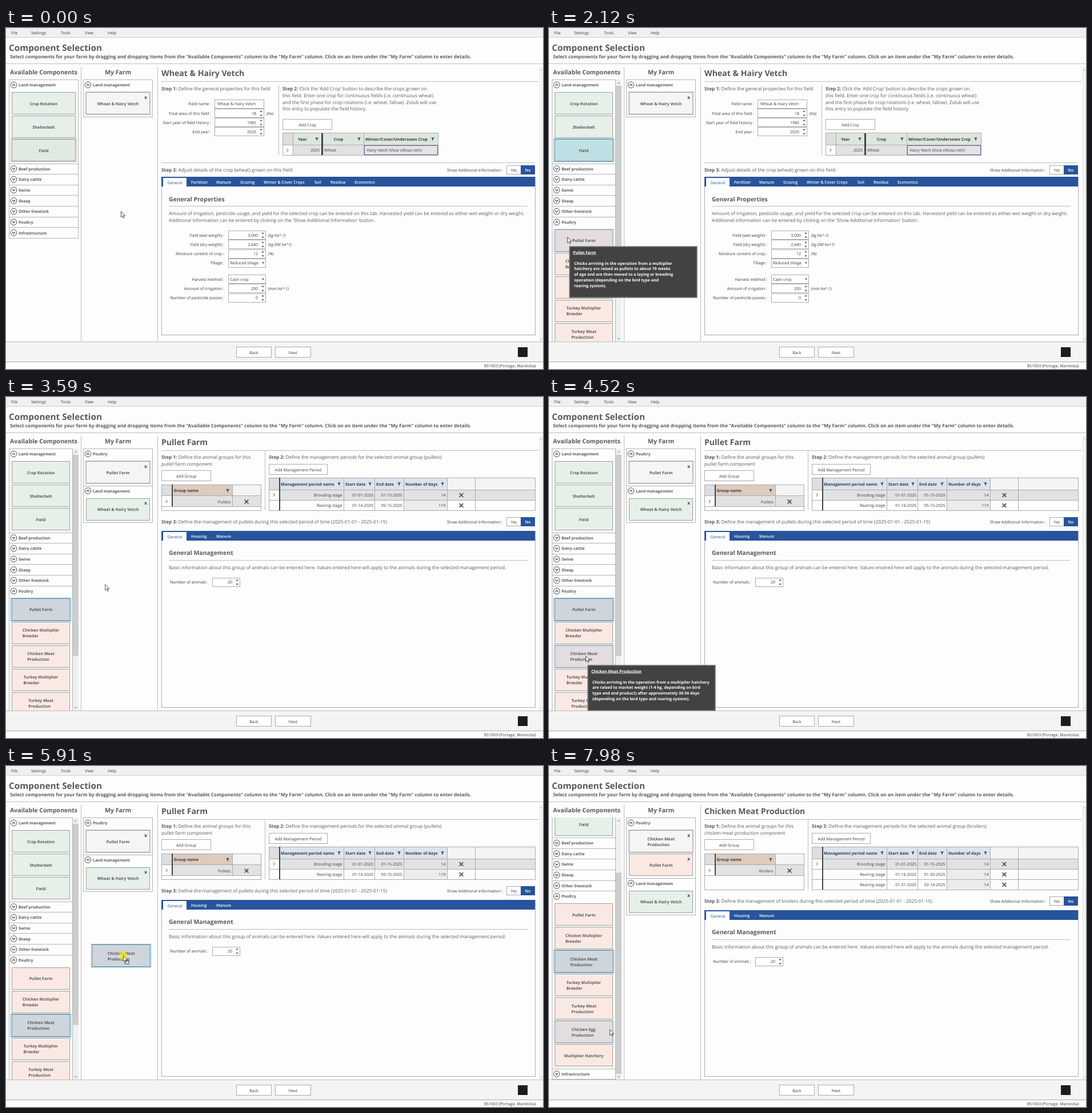
Animation, 940 px wide and 596 px high, one loop 8 s. Source, as an HTML page:

```html
<!DOCTYPE html>
<html lang="en">
<head>
<meta charset="utf-8">
<title>Component selection</title>
<style>
html, body { margin: 0; width: 100%; height: 100%; overflow: hidden; background: #fdfdfd; }
svg { display: block; width: 100%; height: 100%; }
text { font-family: "Open Sans", "Noto Sans", sans-serif; fill: #3c3c3c; text-rendering: geometricPrecision; }
.b { font-weight: 700; }
.s { font-weight: 600; }
.i { font-style: italic; }
.m { text-anchor: middle; }
.e { text-anchor: end; }
.g { fill: #5a5a5a; }
.w { fill: #fff; }
.n { fill: #27549b; }
.u { text-decoration: underline; }
</style>
</head>
<body>
<svg id="stage" viewBox="0 0 940 596" xmlns="http://www.w3.org/2000/svg"></svg>
<script>
const LOOP = 8000, STEP = 66.5;
const SMALL = 7.05, BODY = 8.26;
const BLUE = '#27549b', GRAY = '#ababab', SHADE = '#e2e2e2';

// cursor: time, x, y
const MOVES = [
  [140, 201, 320], [860, 22, 337], [1530, 22, 337], [1850, 32, 365],
  [2320, 32, 365], [2400, 106, 363], [2660, 176, 324], [3530, 176, 324],
  [4320, 64, 452], [4720, 64, 452], [4800, 78, 448], [5580, 199, 341],
  [5910, 205, 331], [6190, 205, 331], [6840, 124, 365], [6850, 124, 365],
  [7250, 125, 416], [7640, 125, 450], [7790, 125, 450], [7980, 106, 460]
];
const THUMB = [[6850, 0], [7250, 51.5], [7640, 85.5]];
const PRESSES = [[1200, 1330], [2250, 2920], [4580, 6050], [6910, 7710]];

const LAND = ['Crop Rotation', 'Shelterbelt', 'Field'];
const BIRDS = ['Pullet Farm', 'Chicken Multiplier|Breeder', 'Chicken Meat|Production', 'Turkey Multiplier|Breeder',
  'Turkey Meat|Production', 'Chicken Egg|Production', 'Multiplier Hatchery'];
const WHEAT = 'Wheat & Hairy Vetch', PULLET = BIRDS[0], BROILER = BIRDS[2];
const INDENT = { 'Chicken Multiplier': 32.2, 'Turkey Multiplier': 30.4, 'Chicken Meat': 23.8, 'Turkey Meat': 21.7, 'Chicken Egg': 21.5 };

const within = (t, [a, b]) => t >= a && t < b;

function track(keys, t) {
  if (t <= keys[0][0]) return keys[0].slice(1);
  for (let k = 1; k < keys.length; k++) {
    const [t0, ...a] = keys[k - 1], [t1, ...b] = keys[k];
    if (t < t1) {
      const p = (t - t0) / (t1 - t0), s = p * p * (3 - 2 * p);
      return a.map((v, j) => v + (b[j] - v) * s);
    }
  }
  return keys[keys.length - 1].slice(1);
}

// y is the middle of the capitals
const txt = (x, y, s, cls = '', size = SMALL) =>
  `<text x="${x}" y="${(y + size * 0.357).toFixed(2)}" font-size="${size}" class="${cls}">${s}</text>`;
const fill = (x, y, r, b, color) => `<rect x="${x}" y="${y}" width="${r - x}" height="${b - y}" fill="${color}"/>`;
const box = (x, y, r, b, color = 'none', stroke = GRAY) => {
  const top = Math.round(y), low = Math.round(b);
  return `<rect x="${x + 0.5}" y="${top + 0.5}" width="${r - x - 1}" height="${low - top - 1}" fill="${color}" stroke="${stroke}"/>`;
};
const hline = (x, r, y, color = '#bdbdbd') => fill(x, y, r, y + 1, color);
const vline = (x, y, b, color = '#bdbdbd') => fill(x, y, x + 1, b, color);
const path = (x, y, d, attrs) => `<path transform="translate(${x} ${y})" d="${d}" ${attrs}/>`;
const chevron = (x, y, up, size, color, w = 1) =>
  path(x, y, up ? `M${-size} ${size / 2}L0 ${-size / 2}L${size} ${size / 2}` : `M${-size} ${-size / 2}L0 ${size / 2}L${size} ${-size / 2}`,
    `fill="none" stroke="${color}" stroke-width="${w}"`);
const triangle = (x, y, up) => path(x, y, up ? 'M-2 1.3H2L0-1.5Z' : 'M-2-1.3H2L0 1.5Z', 'fill="#444"');
const funnel = (x, y) => path(x, y, 'M-2.8-2.6H2.8L.8 .2V3L-.8 2V.2Z', 'fill="#444"');
const cross = (x, y) => path(x, y, 'M-3.4-3.4L3.4 3.4M3.4-3.4L-3.4 3.4', 'stroke="#4a4a4a" stroke-width="1.5"');
const pointer = (x, y) => path(x, y, 'M1.5-2.6L4 0L1.5 2.6', 'fill="none" stroke="#444"');
const button = (x, y, r, b, s) => box(x, y, r, b, '#fff') + txt((x + r) / 2, (y + b) / 2 + 0.5, s, 'm');
const step = (x, y, n, s) => txt(x, y, `<tspan class="b">Step ${n}:</tspan> ${s}`, 'g', BODY);

function label(cx, cy, name) {
  const [first, second] = name.split('|');
  if (!second) return txt(cx, cy + 0.5, first, 'b g m');
  const x = cx - INDENT[first];
  return txt(x, cy - 4.5, first, 'b g') + txt(x, cy + 5.5, second, 'b g');
}

function tile(x, y, r, name, state) {
  const land = LAND.includes(name) || name === WHEAT;
  const look = {
    sel: ['#e0f0f9', '#4fa9d8', land ? '#bfe0e3' : '#cfd5dc'],
    hover: ['#f4f9fc', '#b3d6e9', land ? '#dbe8e6' : '#e3dde0'],
    idle: ['#f6f6f6', '#c6c6c6', '#e0eae2'],
    own: ['#fdfdfd', '#d2d2d2', '#f5f5f5']
  }[state];
  const color = look ? look[2] : land ? '#e6f0e8' : '#fae9e3';
  return (look ? box(x - 2, y - 1, r + 2, y + 40, look[0], look[1]) : '') +
    box(x, y, r, y + 39, color, '#9a9d9b') + label((x + r) / 2, y + 19.5, name);
}

function groups(x, y, r, list, stateOf, extra) {
  let out = '';
  for (const [title, tiles = []] of list) {
    const n = tiles.length, h = n ? 23.5 + 41 * n : 18.65;
    const hot = stateOf(title, x, y, r, y + 18) === 'hover';
    out += box(x, y, r, y + h + 1, '#fdfdfd', '#b4b4b4') +
      `<circle cx="${x + 8.5}" cy="${y + 9.5}" r="5.3" fill="${hot ? '#d8eefa' : '#fff'}" stroke="${hot ? '#3f9fd6' : '#444'}"/>` +
      chevron(x + 8.5, y + 9.5, n > 0, 2.4, '#333', 1.2) + txt(x + 17, y + 9.7, title, 'b g', 6.95);
    tiles.forEach((name, k) => {
      const top = y + 22 + 41 * k;
      out += tile(x + 5, top, r - 5, name, stateOf(name, x + 3, top - 1, r - 3, top + 40));
      if (extra) out += txt(r - 12.5, top + 9, 'x', 'b m', 8);
    });
    y += h;
  }
  return out;
}

function input(x, r, y, value, kind = 'num') {
  let out = box(x, y - 8, r, y + 8, '#fff');
  if (kind === 'num') out += txt(r - 14, y, value, 'e') + triangle(r - 5.5, y - 3.6, true) + triangle(r - 5.5, y + 4, false);
  else out += txt(x + (kind === 'combo' ? 3 : 5), y, value) + (kind === 'combo' ? triangle(r - 5, y, false) : '');
  return out;
}
const row = (lx, x, r, y, name, value, unit = '', kind) =>
  txt(lx, y, name + ' :', 'e') + input(x, r, y, value, kind) + txt(r + 4, y, unit, 'i');

const toggle = y => txt(772, y, 'Show Additional Information :') + box(876, y - 8, 902, y + 8, '#fff') +
  txt(889, y, 'Yes', 'm') + fill(901, y - 8, 926, y + 8, BLUE) + txt(913.5, y, 'No', 'm w s');

function tabs(y, bottom, list) {
  return box(272, y, 927, bottom, '#fdfdfd', '#a3abb8') + fill(272, y, 926, y + 17, BLUE) +
    fill(275, y + 2, 316, y + 17, '#fdfdfd') + txt(295.5, y + 10, 'General', 'm n') +
    list.map(([x, s]) => txt(x, y + 10, s, 'w s', 6.95)).join('');
}

function frame() {
  const menu = [[9, 'File'], [44, 'Settings'], [96, 'Tools'], [138, 'View'], [178, 'Help']];
  return fill(0, 0, 940, 596, '#fdfdfd') + fill(0, 0, 940, 17, '#f0f0f0') + hline(0, 940, 16, '#cfcfcf') +
    menu.map(([x, s]) => txt(x, 8.5, s)).join('') +
    txt(5, 34.5, 'Component Selection', 'b g', 15.3) +
    txt(7, 50.5, 'Select components for your farm by dragging and dropping items from the "Available Components" column to the "My Farm" column. Click on an item under the "My Farm" column to enter details.', 'b g', 8.27) +
    hline(0, 940, 62) + vline(131, 68, 548) + vline(265, 68, 548) +
    txt(7, 77, 'Available Components', 'b g', 10.55) + txt(196, 77, 'My Farm', 'b g m', 10.55) +
    fill(933, 68, 940, 548, '#f2f2f2') + chevron(937, 73, true, 2, '#bbb') + chevron(937, 544, false, 2, '#bbb') +
    fill(0, 549, 940, 583, '#f4f4f4') + hline(0, 940, 548) + hline(0, 940, 583, '#a8a8a8') +
    button(403, 557, 465, 576, 'Back') + button(471, 557, 534, 576, 'Next') +
    fill(896, 558, 913, 575, '#1c1c1c') + txt(837, 590.5, '851003 (Portage, Manitoba)');
}

function fieldPanel() {
  const intro = ["Click the 'Add Crop' button to describe the crops grown on", 'this field. Enter one crop for continuous fields (i.e. continuous wheat)',
    'and the first phase for crop rotations (i.e. wheat, fallow). Zolub will use', 'this entry to populate the field history.'];
  return txt(272, 79, WHEAT, 'b g', 14.1) + hline(272, 932, 93) + vline(477, 100, 222) +
    step(272, 106, 1, 'Define the general properties for this field') +
    row(359, 365, 452, 132.5, 'Field name', WHEAT, '', 'text') +
    row(359, 365, 452, 149, 'Total area of this field', '18', '(ha)') +
    row(359, 365, 452, 165, 'Start year of field history', '1985') +
    row(359, 365, 452, 181, 'End year', '2025') +
    step(484, 106, 2, intro[0]) + intro.slice(1).map((s, k) => txt(484, 118 + 11.7 * k, s, 'g', BODY)).join('') +
    button(484, 159, 571, 178, 'Add Crop') +
    fill(484, 183, 756, 204, '#dde6de') + fill(484, 183, 502, 204, '#dedede') + fill(502, 204, 756, 222, SHADE) +
    box(484, 183, 757, 223) + hline(484, 756, 204, GRAY) + vline(502, 183, 222, GRAY) + vline(626, 183, 222, GRAY) +
    fill(552, 184, 555, 222, '#444') + pointer(490, 213.5) +
    txt(519, 194.5, 'Year', 'b m') + txt(582, 194.5, 'Crop', 'b m') + txt(629, 194.5, 'Winter/Cover/Undersown Crop', 'b', 7.1) +
    funnel(544, 194) + funnel(618, 194) + funnel(747, 194) +
    txt(549, 213.5, '2025', 'e') + txt(557, 213.5, 'Wheat') +
    box(627, 205, 756, 222, '#e4e4e7', '#5c6c92') + txt(631.5, 213.5, 'Hairy Vetch (Vicia villosa roth)') +
    hline(272, 926, 235) + step(272, 248.5, 3, 'Adjust details of the crop (wheat) grown on this field') + toggle(248) +
    tabs(260, 537, [[324, 'Fertilizer'], [368, 'Manure'], [410, 'Grazing'], [451, 'Winter & Cover Crops'], [540, 'Soil'], [568, 'Residue'], [610, 'Economics']]) +
    txt(285, 299, 'General Properties', 'b g', 10.45) + hline(285, 913, 311) +
    txt(285, 324.5, 'Amount of irrigation, pesticide usage, and yield for the selected crop can be entered on this tab. Harvested yield can be entered as either wet weight or dry weight.', 'g', BODY) +
    txt(285, 336.5, "Additional information can be entered by clicking on the 'Show Additional Information' button.", 'g', BODY) +
    row(382, 389, 455, 362, 'Yield (wet weight)', '3,000', '(kg ha^-1)') +
    row(382, 389, 455, 378, 'Yield (dry weight)', '2,640', '(kg DM ha^1)') +
    row(382, 389, 455, 394.5, 'Moisture content of crop', '12', '(%)') +
    row(382, 389, 455, 410.5, 'Tillage', 'Reduced tillage', '', 'combo') +
    row(382, 389, 455, 439, 'Harvest method', 'Cash crop', '', 'combo') +
    row(382, 389, 455, 455, 'Amount of irrigation', '200', '(mm ha^-1)') +
    row(382, 389, 455, 471.5, 'Number of pesticide passes', '0');
}

function birdPanel(title, part, group, periods) {
  const low = 162 + 18 * periods.length, d = low - 198;
  const heads = [[481, 583, 'Management period name'], [594, 637, 'Start date'], [648, 688, 'End date'], [699, 764, 'Number of days']];
  const cells = periods.map(([name, from, to, days], k) => {
    const y = 171.5 + 18 * k;
    return txt(588.5, y, name, 'e') + txt(643, y, from, 'e') + txt(693.5, y, to, 'e') + txt(769.5, y, days, 'e') +
      cross(797, y) + hline(460, 926, 162 + 18 * k, GRAY);
  }).join('');
  return txt(272, 79, title, 'b g', 14.06) + hline(272, 932, 93) + vline(453, 94, low) +
    step(272, 105, 1, 'Define the animal groups for this') + txt(272, 117, part + ' component', 'g', BODY) +
    button(272, 128, 359, 147, 'Add Group') +
    fill(272, 153, 446, 173, '#f4f4f4') + fill(272, 153, 290, 173, '#dedede') + fill(292, 153, 396, 173, '#dccbbf') +
    fill(292, 173, 446, 191, SHADE) + box(272, 153, 447, low + 1) + hline(272, 446, 172, GRAY) + hline(272, 446, 191, GRAY) +
    vline(396, 153, 191, GRAY) + fill(290, 153, 292, 191, '#444') + pointer(278.5, 182.5) +
    txt(293.5, 163.5, 'Group name', 'b') + funnel(388, 163.5) + txt(393, 183, group, 'e') + cross(421, 183) +
    step(460, 105, 2, `Define the management periods for the selected animal group (${group.toLowerCase()})`) +
    button(460, 117, 563, 136, 'Add Management Period') +
    fill(460, 141, 926, 162, '#f4f4f4') + fill(460, 141, 478, 162, '#dedede') + fill(480, 141, 772, 162, '#dbe3f0') +
    fill(696, 162, 772, low, '#ececec') + fill(480, 162, 926, 180, SHADE) +
    box(460, 141, 927, low + 1) + [591, 645, 696, 772, 821].map(x => vline(x, 141, low, GRAY)).join('') +
    cells + fill(478, 141, 480, low, '#444') + pointer(466.5, 171) +
    heads.map(([x, f, s]) => txt(x, 152.5, s, 'b', 7.1) + funnel(f, 152)).join('') +
    step(272, 218.5 + d, 3, `Define the management of ${group.toLowerCase()} during this selected period of time (2025-01-01 - 2025-01-15)`) +
    toggle(218 + d) + tabs(234 + d, 543, [[324, 'Housing'], [368, 'Manure']]) +
    txt(285, 272 + d, 'General Management', 'b g', 10.45) + hline(285, 913, 285 + d) +
    txt(285, 298 + d, 'Basic information about this group of animals can be entered here. Values entered here will apply to the animals during the selected management period.', 'g', BODY) +
    row(354, 361, 410, 323.5 + d, 'Number of animals', '20');
}

const panels = [
  fieldPanel(),
  birdPanel('Pullet Farm', 'pullet farm', 'Pullets', [['Brooding stage', '01-01-2025', '01-15-2025', '14'], ['Rearing stage', '01-16-2025', '05-15-2025', '119']]),
  birdPanel('Chicken Meat Production', 'chicken meat production', 'Broilers', [['Brooding stage', '01-01-2025', '01-15-2025', '14'],
    ['Rearing stage', '01-16-2025', '01-30-2025', '14'], ['Rearing stage', '01-31-2025', '02-14-2025', '14']])
];
const farms = [
  [['Land management', [WHEAT]]],
  [['Poultry', [PULLET]], ['Land management', [WHEAT]]],
  [['Poultry', [BROILER, PULLET]], ['Land management', [WHEAT]]]
];
const shell = frame();

function tip(x, y, title, lines) {
  return `<rect x="${x + 1}" y="${y + 1}" width="223" height="${39 + 10 * lines.length}" fill="#424242" stroke="#7c7c7c" stroke-width="1.6"/>` +
    txt(x + 7, y + 11, title, 'b w u', 7) + lines.map((s, k) => txt(x + 9, y + 30 + 9.8 * k, s, 'b w', 7)).join('');
}

function available(t, mx, my, dragging) {
  const open = t >= 1330, shift = track(THUMB, t)[0];
  const chosen = t < 2250 ? 'Field' : t < 4580 ? PULLET : BROILER;
  const list = [['Land management', LAND], ['Beef production'], ['Dairy cattle'], ['Swine'], ['Sheep'], ['Other livestock'],
    ['Poultry', open ? BIRDS : []], ['Infrastructure']];
  const stateOf = (name, x, y, r, b) => {
    if (name === chosen) return t < 1200 ? 'idle' : 'sel';
    return !dragging && mx >= x && mx < r && my >= y && my < b ? 'hover' : '';
  };
  let out = '<clipPath id="list"><rect x="0" y="90" width="131" height="458"/></clipPath><g clip-path="url(#list)">' +
    groups(5, 90 - shift * 1.304, open ? 117 : 127, list, stateOf) + '</g>';
  if (open) {
    const thumb = within(t, PRESSES[3]) ? '#606060' : !dragging && mx > 116 && mx < 128 ? '#a6a6a6' : '#cdcdcd';
    out += fill(117, 90, 127, 548, '#f0f0f0') + fill(117, 101 + shift, 127, 452.5 + shift, thumb) +
      chevron(122, 96, true, 2.2, '#777') + chevron(122, 543, false, 2.2, '#777');
  }
  return out;
}

function draw(t) {
  const [mx, my] = track(MOVES, t);
  const page = t < 3390 ? 0 : t < 6450 ? 1 : 2;
  const first = within(t, [2380, 3190]), second = within(t, [4780, 6250]), dragging = first || second;
  const top = farms[page][0][1][0];
  let out = shell + available(t, mx, my, dragging) +
    groups(135, 90, 257, farms[page], name => name === top ? 'own' : '', true) + panels[page];
  if (first) out += tile(mx - 22, my - 13, mx + 79, PULLET, 'sel');
  if (second) out += tile(mx - 54, my - 19, mx + 47, BROILER, 'sel');
  if (within(t, [1980, 2250])) out += tip(35, 381, 'Pullet Farm', ['Chicks arriving in the operation from a multiplier', 'hatchery are raised as pullets to about 19 weeks',
    'of age and are then moved to a laying or breeding', 'operation (depending on the bird type and', 'rearing system).']);
  if (within(t, [4520, 4780])) out += tip(67, 468, 'Chicken Meat Production', ['Chicks arriving in the operation from a multiplier hatchery',
    'are raised to market weight (1-4 kg, depending on bird', 'type and end product) after approximately 30-56 days', '(depending on the bird type and rearing system).']);
  if (PRESSES.some(p => within(t, p))) out += `<circle cx="${mx}" cy="${my}" r="7.8" fill="#fff000" opacity=".6"/>`;
  if (dragging) out += `<rect x="${mx + 3.5}" y="${my + 9.5}" width="6.5" height="5.5" fill="#f4f4f4" stroke="#333" stroke-width=".9"/>`;
  return out + path(mx, my, 'M.4.5V10.6L2.8 8.5L4.5 12.2L6 11.5L4.4 7.9H7.6Z', 'fill="#fff" stroke="#222" stroke-width=".8"');
}

const stage = document.getElementById('stage'), start = performance.now();
let shown = -1;
function tick() {
  const n = Math.floor(((performance.now() - start) % LOOP + 12) / STEP);
  if (n !== shown) {
    shown = n;
    stage.innerHTML = draw(n * STEP + 12);
  }
  requestAnimationFrame(tick);
}
tick();
</script>
</body>
</html>
```
